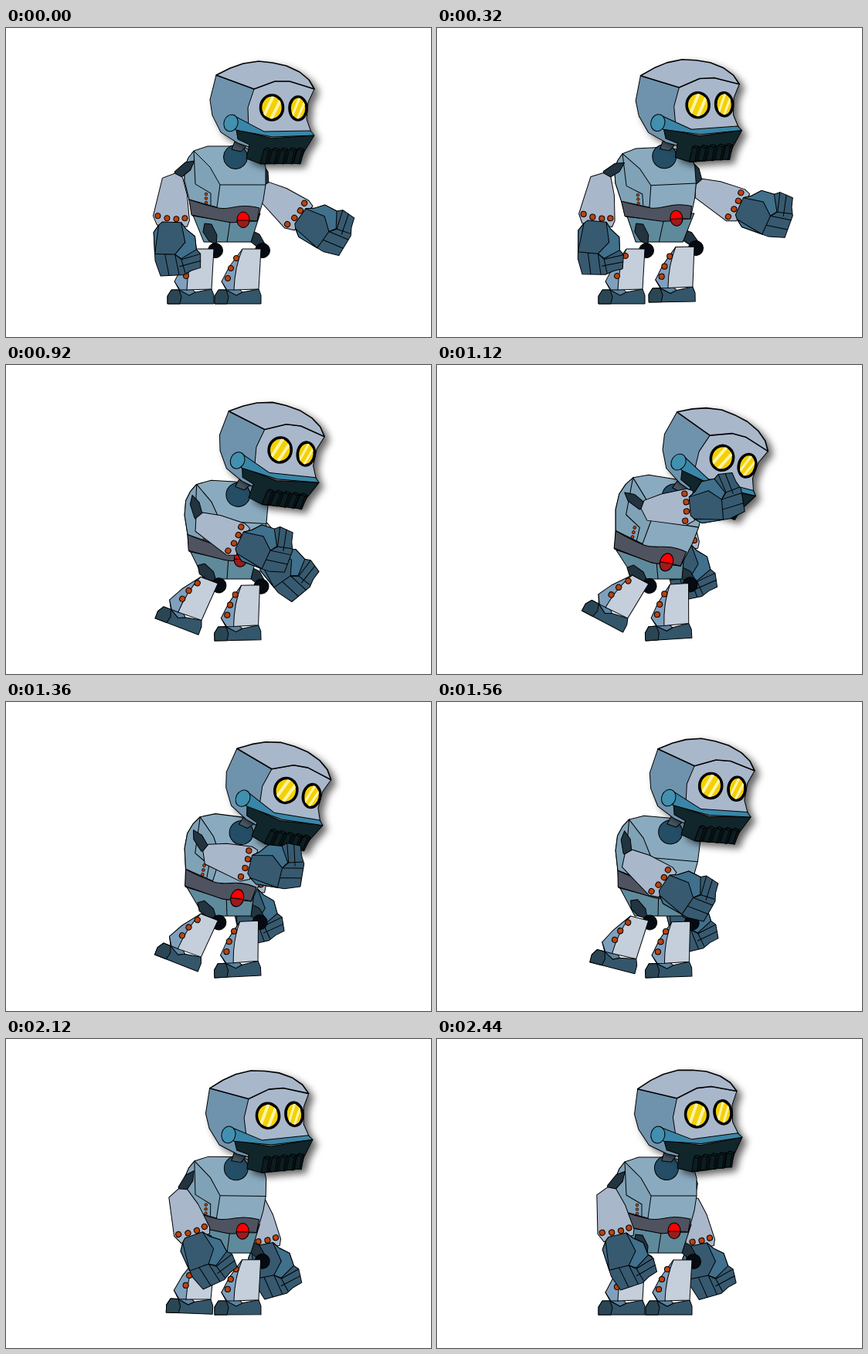
Recreate the animation shown at these times as an HTML page. Size 550 by 400 pixels, loop 2480 ms.

```html
<!DOCTYPE html>
<html lang="en">
<head>
<meta charset="utf-8">
<title>Robot</title>
<style>
  html, body { margin: 0; width: 100%; height: 100%; overflow: hidden; background: #fff; }
  svg { display: block; width: 100vw; height: 100vh; }
  .ink { stroke: #000; stroke-linejoin: round; }
  .line { fill: none; }
  .dark { fill: #21343f; }
  .plate { fill: #a9b7cb; }
  .rivet { fill: #bb430e; }
  .shadow { filter: drop-shadow(6px 5px 5px rgba(0, 0, 0, .6)); }
</style>
</head>
<body>
<svg viewBox="0 0 550 400">
  <defs>
    <path id="upper" class="dark" d="M-4 1L7 -6 24 -7 30 -3 25 4 7 6Z"/>
    <!-- forearm and fist, elbow at the zero point -->
    <g id="lower" transform="translate(-212 -192)">
      <path class="plate" d="M198 194L214 188 224 193 230 216 233 249 230 257 191 255 186 243Z"/>
      <g class="rivet">
        <circle cx="192" cy="243" r="3.6"/><circle cx="204" cy="246" r="3.6"/>
        <circle cx="216" cy="247" r="3.6"/><circle cx="227" cy="246" r="3.6"/>
      </g>
      <g transform="rotate(-3 211 250)">
        <path fill="#375a70" d="M193 254L198 250 222 252 228 261 239 271 240 288 245 294 244 312 232 315 222 320 192 320 186 300 186 263Z"/>
        <path fill="#40708c" d="M222 252L228 261 239 271 240 288 220 299 212 293 226 278Z"/>
        <path fill="#40708c" d="M193 254L186 263V291L189 275Z"/>
        <path class="line" d="M186 291L212 293 220 300 245 294M212 293L216 320M199 292L203 320M220 300L224 318M217 309L245 303"/>
      </g>
    </g>
    <!-- shin and foot, heel at the zero point -->
    <g id="leg">
      <circle cx="62" cy="-69" r="9.5" fill="#060a12"/>
      <path fill="#34566a" d="M0 0V-10L5 -18H15L28 -11 36 -15 57 -19 60 -11V0Z"/>
      <path fill="#2a4655" d="M0 0V-10L5 -18H15L18 -9 16 0Z"/>
      <path fill="#5c83a0" d="M9 -29L15 -18 28 -11 36 -15 32 -19Z"/>
      <path fill="#7fa0bd" d="M36 -71L19 -48 9 -29 16 -18 26 -18 40 -60Z"/>
      <path fill="#c5cfdb" d="M36 -71Q26 -48 25 -18L57 -19 60 -71Z"/>
    </g>
    <g id="studs" class="rivet">
      <circle cx="35" cy="-62" r="3.6"/><circle cx="28" cy="-49" r="3.6"/><circle cx="24" cy="-36" r="3.6"/>
    </g>
    <path id="tooth" fill="#0c1d21" d="M334 157L337 155 343 157 338 176 329 175ZM334 157L340 159 343 157M340 159L336 176"/>
    <clipPath id="lensA"><ellipse cx="344" cy="103" rx="13" ry="14.5"/></clipPath>
    <clipPath id="lensB"><ellipse cx="378" cy="104" rx="9.5" ry="13.5"/></clipPath>
  </defs>

  <g class="ink">
    <use id="farUpper" href="#upper"/>
    <use id="farLower" href="#lower"/>
    <path id="farThigh" class="dark" d="M318 262L328 267 337 283 327 285 312 273Z"/>
    <g id="farLeg"><use href="#leg"/><use href="#studs" x="-7" y="3"/></g>

    <g id="pelvis">
      <path fill="#5f8a9c" d="M241 240L256 277H317L329 240Z"/>
      <path class="line" d="M291 244L286 277"/>
    </g>
    <path id="nearThigh" class="dark" d="M257 253L266 254 273 268 272 281 262 275 255 264Z"/>
    <g id="nearLeg"><use href="#leg"/><use href="#studs"/></g>

    <g id="torso">
      <path fill="#8aabbf" d="M243 159L261 153H303L331 163 336 180V203L333 222 328 240 325 250 290 251 241 243 237 222 231 198V180L236 168Z"/>
      <path fill="#7fa2b7" d="M243 159L236 168 231 180V198L237 222 273 232 277 203 264 180Z"/>
      <path class="line" d="M277 203H336M243 159L245 202 265 214V229"/>
      <g class="rivet" stroke-width=".7"><circle cx="259" cy="215" r="1.8"/><circle cx="259" cy="220.5" r="1.8"/><circle cx="259" cy="226" r="1.8"/></g>
      <path fill="#4f5360" d="M237 222C250 227 262 230 275 233C292 236 300 226 328 233L325 250C308 247 300 254 286 251L240 242Z"/>
      <ellipse cx="307" cy="248" rx="8" ry="10" fill="#f00"/>
      <path fill="#9a1c1c" d="M299 249A8 9.5 0 0 0 315 249Z"/>
    </g>

    <g id="neck">
      <circle cx="297" cy="167" r="15.5" fill="#244d66"/>
      <path fill="#4a5966" d="M296 147L311 153 304 160 292 157Z"/>
    </g>

    <g class="shadow"><g id="head">
      <path fill="#6f93ad" d="M272 61L264 93 267 113 278 135 300 149 314 154 325 130 321 79Z"/>
      <path class="plate" d="M321 79L313 103 314 134 345 140 396 138 389 118 391 96 399 79 367 69H348Z"/>
      <path class="plate" stroke-width="1.6" d="M272 61L290 52 307 46 327 43 345 45 363 49 380 57 392 67 399 79 367 69H348L321 79Z"/>
      <path fill="#10262b" d="M298 131L344 143 399 139 386 160 380 175 330 176 311 169 315 151 300 144Z"/>
      <path fill="#3a86a8" d="M294 113L334 134 394 133 399 139 345 141 297 132Z"/>
      <ellipse cx="291" cy="123" rx="9" ry="11" fill="#4190b0" transform="rotate(18 291 123)"/>
      <use href="#tooth"/><use href="#tooth" x="11"/><use href="#tooth" x="22"/><use href="#tooth" x="33"/><use href="#tooth" x="43"/>
      <g fill="#f3d104" stroke-width="3.6">
        <ellipse cx="344" cy="103" rx="14.5" ry="16"/>
        <ellipse cx="378" cy="104" rx="11" ry="15"/>
      </g>
      <g stroke="#fff3a6" stroke-width="4">
        <path clip-path="url(#lensA)" d="M333 115L346 88M342 120L356 92"/>
        <path clip-path="url(#lensB)" stroke-width="3" d="M370 115L380 90M377 118L387 95"/>
      </g>
    </g></g>

    <use id="nearUpper" href="#upper"/>
    <use id="nearLower" href="#lower"/>
  </g>
</svg>
<script>
const LOOP = 2480, STEP = 40, UPPER_ARM = 30;

const easeIn = u => u * u;
const easeOut = power => u => 1 - (1 - u) ** power;

// Angles in degrees; arms give shoulder and elbow. Ease leads to the next pose.
const POSES = [
  { at: 0, ease: easeIn, lean: 0, head: 0, lift: 0, nearArm: [145, 0], farArm: [90, -56] },
  { at: 760, ease: easeOut(3), lean: -1.4, head: -18, lift: 0, nearArm: [184, 22], farArm: [25, -118] },
  { at: 1200, ease: easeOut(2), lean: .9, head: 15.5, lift: 28, nearArm: [42, -97], farArm: [205, -8] },
  { at: LOOP, lean: 0, head: -6.8, lift: 0, nearArm: [135, -15], farArm: [103, -13] }
];

const mix = (a, b, k) =>
  Array.isArray(a) ? a.map((v, i) => mix(v, b[i], k)) : a + (b - a) * k;

function poseAt(t) {
  const i = POSES.findIndex(p => p.at > t) - 1;
  const from = POSES[i], to = POSES[i + 1];
  const k = from.ease((t - from.at) / (to.at - from.at));
  const pose = {};
  for (const key of ["lean", "head", "lift", "nearArm", "farArm"]) pose[key] = mix(from[key], to[key], k);
  return pose;
}

const set = (id, value) => document.getElementById(id).setAttribute("transform", value);
const place = (id, x, y, angle, rx = 0, ry = 0) =>
  set(id, `translate(${x} ${y}) rotate(${angle}) translate(${-rx} ${-ry})`);

function arm(side, x, y, [shoulder, elbow]) {
  const a = shoulder * Math.PI / 180;
  place(side + "Upper", x, y, shoulder);
  place(side + "Lower", x + UPPER_ARM * Math.cos(a), y + UPPER_ARM * Math.sin(a), elbow);
}

function draw(t) {
  const { lean, head, lift, nearArm, farArm } = poseAt(t);
  const back = Math.max(0, -lean);

  arm("far", 333 + 5 * lean, 179 + 10 * lean, farArm);
  place("farThigh", 332 + 13 * back, 283 - 11 * back, -22 * back, 332, 283);
  place("farLeg", 270 + 17 * back, 357 - 8 * back, -4 * Math.abs(lean));

  const skew = .27 * lean;
  set("pelvis", `matrix(1 0 ${skew} 1 ${5 * back - 277 * skew} 0)`);
  place("nearThigh", 270 + 3 * back, 280, -lift, 270, 280);
  place("nearLeg", 209 - .77 * lift, 357 - 1.4 * lift, lift);

  set("torso", `translate(291 207) matrix(${1 + .04 * lean} ${.19 * lean} ${-.29 * lean} ${1 + .12 * lean} 0 0) translate(-291 -207)`);
  for (const id of ["neck", "head"]) place(id, 297 + 11 * lean, 167 + 3 * lean, head, 297, 167);
  arm("near", 241 + 6 * lean, 175 - 9 * lean, nearArm);
}

const start = performance.now();
function tick() {
  const t = (performance.now() - start) % LOOP;
  draw(Math.floor(t / STEP) * STEP);
  requestAnimationFrame(tick);
}
tick();
</script>
</body>
</html>
```
